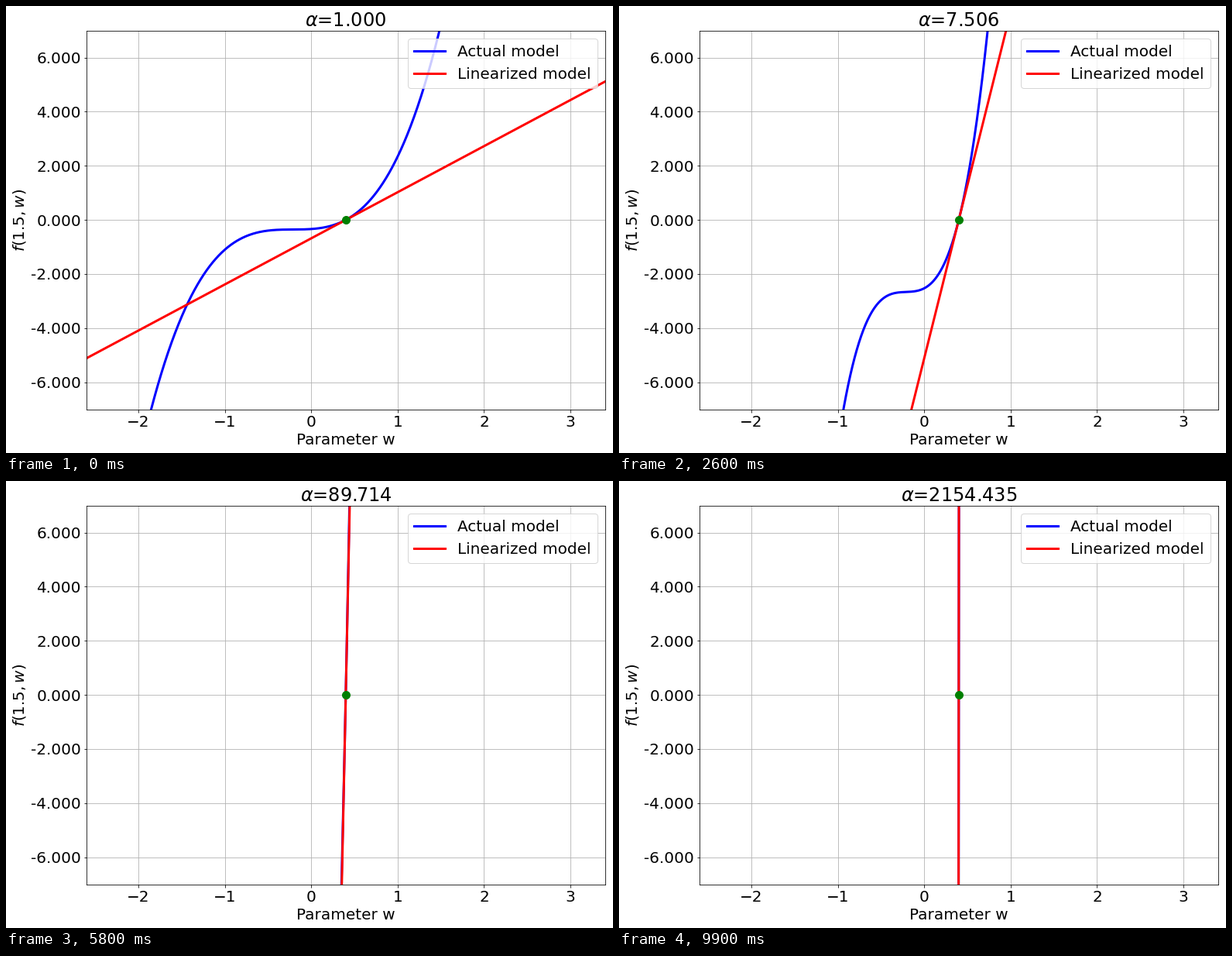
A matplotlib script that plays this animation: 784x577 px, repeating every 10000 ms.

```python
import matplotlib.pyplot as plt
import numpy as np
from matplotlib.animation import FuncAnimation
from matplotlib.ticker import FormatStrFormatter

WIDTH, HEIGHT, DPI = 784, 577, 72
FRAMES, INTERVAL = 100, 100
W0 = 0.4

plt.rcParams.update({"font.family": "DejaVu Sans", "font.size": 20})


def poly(w):
    return 1.5 * w**3 + 0.955 * w**2 + 0.22 * w


def slope(w):
    return 4.5 * w**2 + 1.91 * w + 0.22


w = np.linspace(-2.6, 3.4, 1201)
actual = poly(w) - poly(W0)
tangent = slope(W0) * (w - W0)
alphas = np.logspace(0, 10 / 3, FRAMES)

# The tiny margin keeps the pixel size from rounding down.
fig = plt.figure(figsize=((WIDTH + 0.01) / DPI, (HEIGHT + 0.01) / DPI),
                 dpi=DPI, facecolor="white")
left, bottom, width, height = 104.03, 56.4, 669.6, 488.95
ax = fig.add_axes([left / WIDTH, bottom / HEIGHT,
                   width / WIDTH, height / HEIGHT])
ax.set(xlim=(-2.6, 3.4), ylim=(-7, 7),
       xlabel="Parameter w", ylabel="$f(1.5, w)$")
ax.set_xticks(range(-2, 4))
ax.set_yticks(range(-6, 7, 2))
ax.yaxis.set_major_formatter(FormatStrFormatter("%.3f"))
ax.grid(True)

actual_line, = ax.plot([], [], color="blue", lw=3, label="Actual model")
tangent_line, = ax.plot([], [], color="red", lw=3, label="Linearized model")
ax.plot(W0, 0, "o", color="green", ms=10)
ax.legend(loc="upper right")
title = ax.set_title("", fontsize=24)


def update(i):
    alpha = alphas[i]
    actual_line.set_data(w, alpha * actual)
    tangent_line.set_data(w, alpha * tangent)
    title.set_text(rf"$\alpha$={alpha:.3f}")
    return actual_line, tangent_line, title


anim = FuncAnimation(fig, update, frames=FRAMES, interval=INTERVAL,
                     repeat=True, repeat_delay=0)
plt.show()
```
